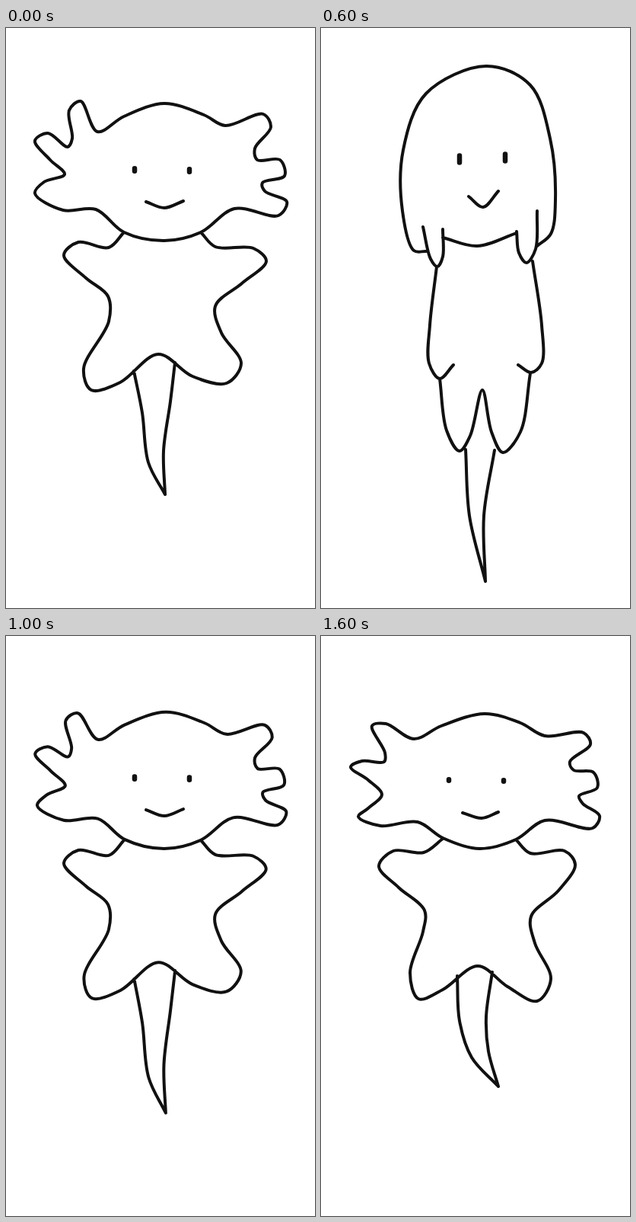
Recreate the animation shown at these times as an HTML page. Size 406 by 761 pixels, loop 1800 ms.

```html
<!DOCTYPE html>
<html lang="en">
<head>
<meta charset="utf-8">
<title>Stretching axolotl</title>
<style>
  html, body { margin: 0; width: 100%; height: 100%; overflow: hidden; background: #fff; }
  svg { display: block; width: 100%; height: 100%; }
  path { fill: none; stroke: #111; stroke-linecap: round; stroke-linejoin: round; }
</style>
</head>
<body>
<svg viewBox="0 0 406 761">
  <path id="lines" stroke-width="4"/>
  <path id="eyes" stroke-width="6.5"/>
</svg>
<script>
const STEP = 200;

// Each part holds strokes of "x y" points, separated by "|"; eyes are the two centres
const star = parse({
  eyeHalf: 1.7,
  eyes: "169 186 241 187",
  mouth: "184 228 208 236 233 227",
  head: `208 279 155 268 118 238 75 239 38 217 50 202 77 192 58 173 38 148 55 138 81 156 87 145 83 108
    98 96 120 136 155 116 208 99 260 114 288 128 338 113 348 130 327 158 330 173 360 173 366 194
    337 203 340 214 369 228 358 246 300 237 256 268 208 279`,
  body: `155 268 135 288 95 281 76 298 105 328 134 352 135 385 102 447 112 475 150 465 200 428
    245 457 290 466 309 440 283 400 275 365 310 335 342 306 325 289 275 287 256 268`,
  tail: "168 450 179 505 187 570 209 612|209 612 207 555 216 490 222 439"
});

const curl = parse({
  eyeHalf: 0.8,
  eyes: "168 189 240 190",
  mouth: "186 232 211 239 233 231",
  head: `208 279 160 265 127 244 78 249 49 237 62 226 80 208 62 189 39 172 54 164 83 165 84 153 67 118
    85 115 122 135 158 118 215 102 262 114 294 131 345 127 354 142 327 165 332 176 358 179 363 199
    339 210 344 220 366 236 357 252 294 242 256 267 208 279`,
  body: `160 266 135 284 95 282 76 302 102 330 136 360 134 388 117 442 128 476 160 464 206 433
    245 460 284 479 302 450 281 403 276 368 312 334 334 300 320 282 275 285 256 267`,
  tail: "179 446 182 505 198 553 233 591|233 591 220 545 217 500 225 441"
});

const rise = parse({
  eyeHalf: 2.7,
  eyes: "179 178 241 175",
  mouth: "193 225 215 236 233 218",
  head: `208 277 149 265 137 285 129 273 131 252 122 252 103 274 94 266 113 219 104 215 78 249 69 241
    105 170 130 115 165 84 218 72 262 84 295 117 333 164 344 187 336 200 311 183 312 196 338 231
    328 239 300 225 307 262 297 271 284 248 262 264 208 277`,
  arms: "167 274 128 335 115 373 128 388 156 366|262 264 300 345 308 371 294 382 271 366",
  legs: "149 377 142 430 126 490 140 512 167 484 210 444 235 490 262 516 284 492 277 420 277 376",
  tail: "178 467 183 515 194 590 214 660|214 660 207 610 218 540 235 487"
});

const tall = parse({
  eyeHalf: 4.5,
  eyes: "182 172 242 170",
  mouth: "194 221 213 235 233 214",
  head: `138 293 122 292 107 240 108 160 138 86 217 50 275 75 301 145 308 225 302 270 284 286
    |160 275 205 286 257 269`,
  gills: "134 261 144 303 153 313 160 300 160 264|284 240 282 290 270 308 260 295 257 267",
  arms: "152 313 143 390 142 440 156 460 174 442|278 306 290 390 290 440 276 452 259 442",
  legs: "156 460 165 528 182 555 196 535 212 475 224 530 239 557 262 530 275 453",
  tail: "190 553 195 640 216 726|216 726 214 640 228 554"
});

function parse({ eyeHalf, ...parts }) {
  const pose = { eyeHalf };
  for (const name in parts) {
    pose[name] = parts[name].split("|").map(s => {
      const n = s.trim().split(/\s+/).map(Number);
      return n.flatMap((x, i) => i % 2 ? [] : [[x, n[i + 1]]]);
    });
  }
  return pose;
}

function mix(a, b, k, headK = k) {
  const pose = { eyeHalf: a.eyeHalf + (b.eyeHalf - a.eyeHalf) * k };
  for (const name in a) {
    if (name === "eyeHalf") continue;
    const amount = name === "head" ? headK : k;
    pose[name] = a[name].map((stroke, s) => stroke.map((p, i) =>
      p.map((v, axis) => v + (b[name][s][i][axis] - v) * amount)));
  }
  return pose;
}

const warpPart = (strokes, f) => strokes.map(stroke => stroke.map(([x, y]) => f(x, y)));

function warp({ eyeHalf, ...parts }, f) {
  const pose = { eyeHalf };
  for (const name in parts) pose[name] = warpPart(parts[name], f);
  return pose;
}

const almostTall = warp(tall, (x, y) => [206 + (x - 206) * 1.01, 56 + (y - 50) * 0.951]);
const fall = {
  ...rise,
  head: warpPart(rise.head, (x, y) => [x - 2, y - (y < 255 ? 3 : 1)]),
  mouth: warpPart(rise.mouth, (x, y) => [x - 1, y + 2])
};
const sway = mix(star, curl, 0.07, 0.55);
const landing = warp(mix(star, sway, 0.5), (x, y) => [x, y > 480 ? y + (y - 480) * 0.11 : y]);
const poses = [star, rise, almostTall, tall, fall, landing, sway, mix(sway, curl, 0.75), curl];

// Centripetal spline; a stroke that ends where it starts is closed smoothly
function smooth(points) {
  const last = points.length - 1;
  const closed = String(points[0]) === String(points[last]);
  const at = i => points[closed ? (i + last) % last : i];
  const gap = i => Math.sqrt(Math.hypot(at(i + 1)[0] - at(i)[0], at(i + 1)[1] - at(i)[1]));
  const slope = (i, axis) => (at(i + 1)[axis] - at(i)[axis]) / gap(i);
  const tangent = (i, axis) => {
    if (!closed && i === 0) return slope(0, axis);
    if (!closed && i === last) return slope(last - 1, axis);
    const before = gap(i - 1), after = gap(i);
    return (slope(i - 1, axis) * after + slope(i, axis) * before) / (before + after);
  };
  let d = `M${points[0]}`;
  for (let i = 0; i < last; i++) {
    const h = gap(i) / 3;
    const c1 = at(i).map((v, axis) => v + tangent(i, axis) * h);
    const c2 = at(i + 1).map((v, axis) => v - tangent(i + 1, axis) * h);
    d += `C${c1} ${c2} ${at(i + 1)}`;
  }
  return d;
}

const drawings = poses.map(({ eyeHalf, eyes, ...parts }) => ({
  lines: Object.values(parts).flat().map(smooth).join(""),
  eyes: eyes[0].map(([x, y]) => `M${x} ${y - eyeHalf}v${2 * eyeHalf}`).join("")
}));

const linesPath = document.getElementById("lines");
const eyesPath = document.getElementById("eyes");

function draw() {
  const drawing = drawings[Math.floor(performance.now() / STEP) % drawings.length];
  linesPath.setAttribute("d", drawing.lines);
  eyesPath.setAttribute("d", drawing.eyes);
  requestAnimationFrame(draw);
}
draw();
</script>
</body>
</html>
```
